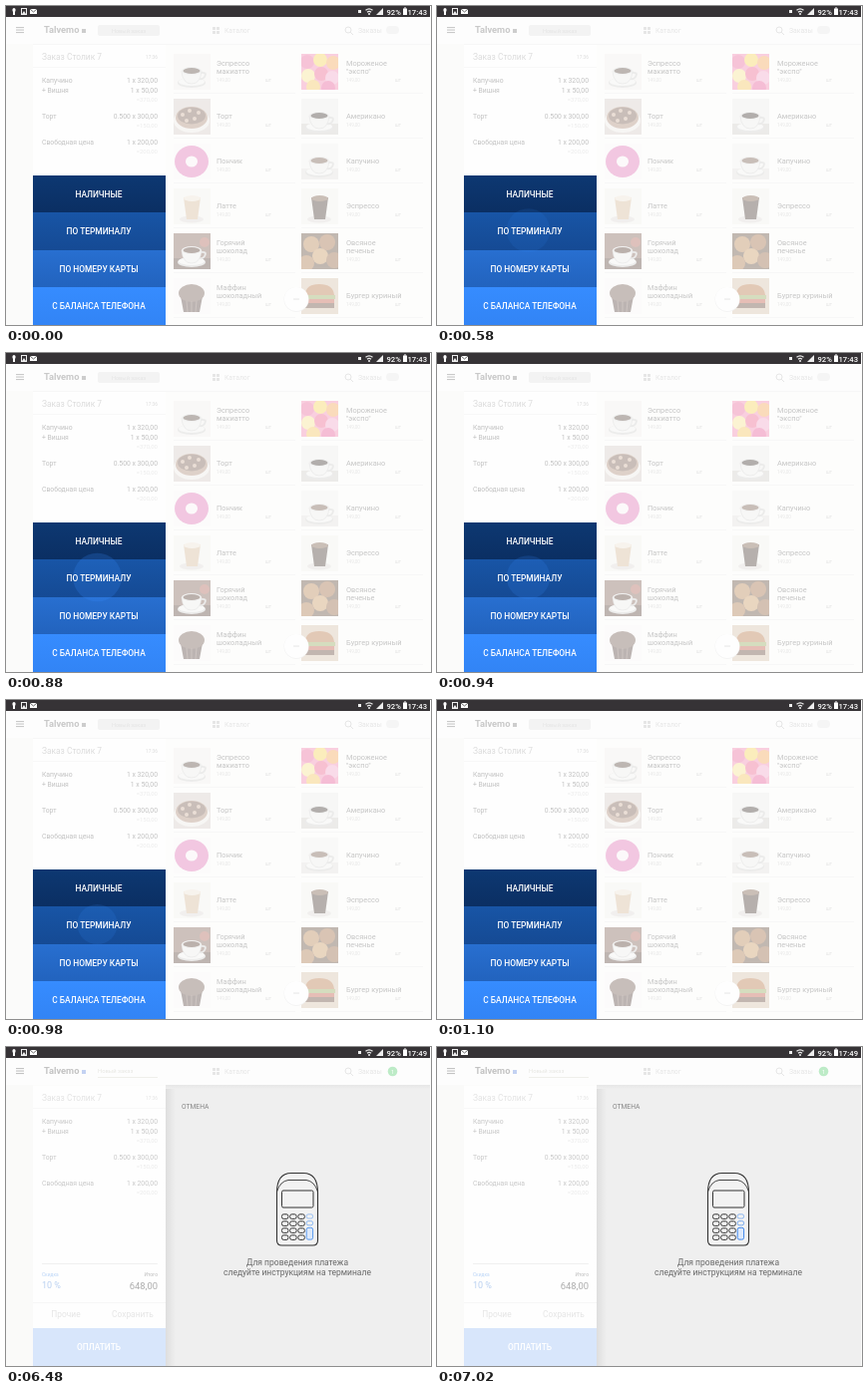
Animation of 426x320 px, one loop 8 s. Source, as an HTML page:

```html
<!DOCTYPE html>
<html lang="ru">
<head>
<meta charset="utf-8">
<title>Оплата заказа</title>
<style>
html, body { margin: 0; width: 100%; height: 100%; overflow: hidden; background: #fff; }
svg { display: block; width: 426px; height: 320px; }
text { font-family: Roboto, "Noto Sans", sans-serif; }
</style>
</head>
<body>
<svg id="stage" viewBox="0 0 426 320" xmlns="http://www.w3.org/2000/svg"></svg>
<script>
const LOOP = 8000, TAP = 500, CONNECT = 1120, FOLLOW = 6480, BLINK = 7020;
const BRAND = 'Talvemo';

const rect = (x, y, w, h, fill, more = '') =>
  `<rect x="${x}" y="${y}" width="${w}" height="${h}" fill="${fill}" ${more}/>`;
const disc = (x, y, rx, fill, ry = rx, more = '') =>
  `<ellipse cx="${x}" cy="${y}" rx="${rx}" ry="${ry}" fill="${fill}" ${more}/>`;
const path = (d, stroke, width = 1, fill = 'none') =>
  `<path d="${d}" stroke="${stroke}" stroke-width="${width}" fill="${fill}"/>`;
const shape = (d, fill) => path(d, 'none', 0, fill);
const label = (x, y, s, size, fill, anchor = 'start', more = '') =>
  `<text x="${x}" y="${y}" font-size="${size}" fill="${fill}" text-anchor="${anchor}" ${more}>${s}</text>`;
const group = (s, more = '') => `<g ${more}>${s}</g>`;
const dots = (list, r) => list.map(([x, y, c]) => disc(x, y, r, c)).join('');

// Product pictures, each in a 37 x 36 box
function cup(back, coffee, low = back) {
  return rect(0, 0, 37, 36, back) + rect(0, 25, 37, 11, low) +
    disc(18, 29, 14, '#cfcfcf', 5) + disc(18, 28, 13, '#f2f2f2', 4) +
    path('M27 19q7-1 4 4q-2 3-5 2', '#ccc', 1.8) +
    path('M8 17q1 13 10 13q9 0 10-13z', '#c0c0c0', .6, '#ededed') +
    disc(18, 17, 10, '#dedede', 4) + disc(18, 17, 8.5, coffee, 3);
}
function glass(coffee, foam) {
  return rect(0, 0, 37, 36, '#f3f2f0') + disc(18, 31, 12, '#dcd9d6', 3.5) +
    shape('M10 9h17l-3 22H13z', coffee) + disc(18.5, 10, 8.5, foam, 3);
}
const pictures = {
  espresso: () => cup('#f2f1ef', '#4d3b32'),
  cake: () => rect(0, 0, 37, 36, '#d4cbc6') + disc(18, 22, 18, '#eeeae8', 12) +
    disc(18, 19, 16, '#a98672', 11) + disc(18, 17, 14, '#6f5244', 8.5) +
    dots([[9, 16, '#c9aa94'], [16, 12, '#c9aa94'], [25, 14, '#c9aa94'], [21, 20, '#c9aa94'], [13, 22, '#c9aa94']], 2),
  donut: () => rect(0, 0, 37, 36, '#fbf9fa') + disc(18, 18, 17, '#e06ab2', 16) +
    disc(18, 18, 6, '#fbf4f8', 5.5),
  latte: () => glass('#d5b794', '#efe3d5'),
  cocoa: () => cup('#7b594d', '#4a2c22', '#51372e') + disc(31, 9, 5, '#a85a4c'),
  muffin: () => rect(0, 0, 37, 36, '#fbfafa') +
    shape('M7 18h22l-3 16H10z', '#4b3633') + disc(18, 15, 13, '#6a5149', 9) +
    path('M13 23l1 11M18 23v11M23 23l-1 11', '#7d655d', 1),
  sweets: () => rect(0, 0, 37, 36, '#f280ae') +
    dots([[6, 8, '#ea5f98'], [19, 6, '#f8d24c'], [32, 9, '#f7a04a'], [7, 22, '#f9e38a'],
      [20, 20, '#ef5686'], [31, 24, '#f4a1c8'], [12, 33, '#f6c24f'], [27, 34, '#e74f91']], 7),
  americano: () => cup('#eeedec', '#2f2622', '#d0cdca'),
  cappuccino: () => cup('#f4f3f1', '#6d5142', '#e4e1de'),
  shot: () => glass('#3a2a24', '#73543f'),
  cookies: () => rect(0, 0, 37, 36, '#5a4030') +
    dots([[10, 11, '#b57c48'], [26, 9, '#9b6238'], [19, 23, '#c79259'], [33, 27, '#8d5a34'], [5, 30, '#a66f40']], 8),
  burger: () => rect(0, 0, 37, 36, '#d6bfa8') + shape('M4 17q0-11 14-11t15 11z', '#b56f3c') +
    rect(3, 17, 31, 4, '#8fa555') + rect(4, 21, 29, 4, '#c0523d') + rect(4, 25, 29, 5, '#5b3b2d')
};
const products = [
  ['espresso', 'Эспрессо', 'макиатто'], ['sweets', 'Мороженое', '"экспо"'],
  ['cake', 'Торт'], ['americano', 'Американо'],
  ['donut', 'Пончик'], ['cappuccino', 'Капучино'],
  ['latte', 'Латте'], ['shot', 'Эспрессо'],
  ['cocoa', 'Горячий', 'шоколад'], ['cookies', 'Овсяное', 'печенье'],
  ['muffin', 'Маффин', 'шоколадный'], ['burger', 'Бургер куриный']
];

function product([kind, first, second], i) {
  const right = i % 2, x = right ? 296 : 168, tx = right ? 341 : 211;
  const y = 48 + 45 * (i >> 1), base = second ? y + 12 : y + 20;
  return group(pictures[kind](), `transform="translate(${x} ${y})" clip-path="url(#frame)" opacity=".36"`) +
    label(tx, base, first, 7.4, '#c6c6c6') +
    (second ? label(tx, base + 8, second, 7.4, '#c6c6c6') : '') +
    label(tx, y + 28, '149,00', 4.6, '#e6e6e6') +
    label(tx + 55, y + 28, 'шт', 4.6, '#e2e2e2', 'end') +
    rect(x, y + 39, 122, 1, '#f7f7f7');
}

function header(ink, soft, mark) {
  return rect(0, 11, 425, 27, '#fdfdfd') +
    [21, 23.5, 26].map(y => rect(10, y, 8, 1.1, ink)).join('') +
    label(38, 27, BRAND, 9.3, ink, 'start', 'font-weight="700"') +
    rect(76, 23, 4, 4, mark) +
    [207, 211].map(x => rect(x, 21, 3, 3, soft) + rect(x, 25, 3, 3, soft)).join('') +
    label(219, 27, 'Каталог', 6.8, soft) +
    `<circle cx="343" cy="24" r="3" fill="none" stroke="${soft}"/>` +
    path('M345 26l3 3', soft) +
    label(353, 27, 'Заказы', 6.8, soft);
}

const order = [
  [77, 'Капучино', '1 x 320,00'], [87, '+ Вишня', '1 x 50,00', '=370,00'],
  [113, 'Торт', '0.500 x 300,00', '=150,00'], [139, 'Свободная цена', '1 x 200,00', '=200,00']
];
function receipt(title, ink, sum) {
  return label(36, 54, 'Заказ Столик 7', 8.4, title) +
    label(152, 53, '17:36', 4.8, title, 'end') +
    rect(27, 61, 133, .6, '#f5f5f5') +
    order.map(([y, name, price, total]) =>
      label(36, y, name, 6.8, ink) + label(152, y, price, 6.8, ink, 'end') +
      (total ? label(152, y + 8.5, total, 6, sum, 'end') : '')).join('');
}

function statusBar() {
  return rect(0, 0, 425, 11, '#363336') +
    rect(6.5, 2, 3, 4, '#fff', 'rx="1.5"') + rect(7, 5, 2, 4, '#fff') +
    rect(15.5, 2.5, 5, 6, 'none', 'stroke="#eee"') + shape('M16 8l2-3l2 3z', '#eee') +
    rect(24, 3, 7, 5, '#fff') + path('M24 3l3.5 3L31 3', '#444', .8) +
    rect(353, 4, 3, 3, '#eee') +
    path('M360.5 4.3q3.5-2.8 7 0M362 6.2q2-1.6 4 0', '#eee', 1.2) + disc(364, 8, 1, '#eee') +
    shape('M371 9h7V2z', '#eee') +
    label(381.5, 8.7, '92%', 7.7, '#fff', 'start', 'font-weight="500"') +
    rect(398, 2.5, 4, 6.5, '#fff') + rect(399, 1.5, 2, 1, '#fff') +
    label(422, 8.7, '', 7.7, '#fff', 'end', 'id="clock" font-weight="500"');
}

const buttons = [
  ['НАЛИЧНЫЕ', '#0d3872', '#0b2f63'], ['ПО ТЕРМИНАЛУ', '#1855a6', '#154a94'],
  ['ПО НОМЕРУ КАРТЫ', '#286fd0', '#2263be'], ['С БАЛАНСА ТЕЛЕФОНА', '#368cff', '#3284f5']
];
const buttonTop = i => Math.floor(170 + 37.5 * i);
const shade = (id, from, to, dir = 'x2="0" y2="1"') =>
  `<linearGradient id="${id}" ${dir}><stop stop-color="${from}"/><stop offset="1" stop-color="${to}"/></linearGradient>`;

function menuScene() {
  return rect(0, 11, 426, 309, '#fdfdfc') + rect(0, 38, 27, 282, '#fbfbfa') +
    header('#c9c9c9', '#e6e6e6', '#cdcdcd') +
    rect(92, 19, 62, 11, '#f3f3f3', 'rx="2"') + label(123, 27, 'Новый заказ', 5.6, '#e4e4e4', 'middle') +
    rect(381, 20, 13, 8, '#f5f5f5', 'rx="4"') +
    rect(27, 38, 398, 1, '#f7f7f7') +
    rect(27, 39, 133, 131, '#fefefe') +
    receipt('#dcdcdc', '#c2c2c2', '#ebebeb') +
    products.map(product).join('') +
    disc(291, 294.5, 12.5, '#f4f4f4') + disc(291, 294, 12, '#fefefe') +
    path('M288 294h6', '#e6e6e6', 1) +
    buttons.map((b, i) => rect(27, buttonTop(i), 133, buttonTop(i + 1) - buttonTop(i), `url(#b${i})`)).join('') +
    '<circle id="tap" cx="91.5" cy="225" fill="#368cff"/>' +
    buttons.map(([s], i) => label(93, 192 + 37.4 * i, s, 8.4, '#fff', 'middle', 'font-weight="500"')).join('');
}

function terminal() {
  const key = (x, y, h, more) => rect(x, y, 6.4, h, 'none', `rx="1.8" ${more}`);
  let keys = '';
  for (let r = 0; r < 4; r++)
    for (let c = 0; c < 3; c++) keys += key(276.5 + 8.2 * c, 172.8 + 7 * r, 4.6, 'stroke="#333"');
  return path('M271.5 151Q271.5 131.5 286 131.5H298Q312.5 131.5 312.5 151V199Q312.5 204 307.5 204H276.5Q271.5 204 271.5 199Z', '#333', 1.1, '#f2f2f2') +
    path('M271.5 150Q275 139.5 283 138.5H301Q309 139.5 312.5 150', '#333', .9) +
    rect(276.5, 149, 31.5, 17, 'none', 'rx="1.5" stroke="#333"') + keys +
    group(key(301.2, 172.8, 4.2, 'opacity=".55"') + key(301.2, 179.6, 4.2, 'opacity=".65"') +
      rect(301.2, 186.3, 6.4, 11.8, '#dce9fb', 'rx="1.8"'), 'id="keys" stroke="#5a9af0"');
}

function payScene() {
  return rect(0, 11, 426, 309, '#fcfcfb') + rect(0, 38, 27, 282, '#fafaf9') +
    header('#c3c3c3', '#e6e6e6', '#c3d2f2') +
    label(92, 26, 'Новый заказ', 5.8, '#e6e6e2') + rect(92, 30, 60, 1, '#efefeb') +
    disc(387.5, 24.5, 4.8, '#bdebc7') + label(387.5, 26.8, '', 5.6, '#fff', 'middle', 'id="count"') +
    rect(27, 39, 133, 243, '#fefefe') +
    rect(160, 38, 265, 282, '#efefef') + rect(160, 38, 10, 282, 'url(#edge)') +
    rect(160, 38, 265, 4, 'url(#top)') +
    receipt('#e3e3e3', '#c8c8c8', '#eaeaea') +
    path('M36 217.5H152', '#ececec', .8) +
    label(36, 230, 'Скидка', 4.8, '#b9d4f7') + label(36, 242, '10 %', 9, '#b9d0f0') +
    label(152, 230, 'Итого', 5, '#bdbdbd', 'end') + label(152, 242.5, '648,00', 9.4, '#ababab', 'end') +
    rect(27, 256, 133, .7, '#f4f4f4') +
    label(60, 271, 'Прочие', 8.4, '#e5e5e5', 'middle') + label(127, 271, 'Сохранить', 8.4, '#e5e5e5', 'middle') +
    rect(27, 282, 133, 38, '#d8e6fb') +
    label(93, 304, 'ОПЛАТИТЬ', 8.4, '#fff', 'middle', 'font-weight="500"') +
    label(176, 62, 'ОТМЕНА', 6.7, '#858585') +
    group(terminal(), 'id="terminal"') +
    group(label(292, 223.5, 'Терминал подключен, вставьте карту...', 8.5, '#696969', 'middle'), 'id="insert"') +
    group(label(292, 219, 'Для проведения платежа', 8.5, '#696969', 'middle') +
      label(292, 228.8, 'следуйте инструкциям на терминале', 8.5, '#696969', 'middle'), 'id="follow"');
}

const $ = id => document.getElementById(id);
$('stage').innerHTML = '<defs>' +
  buttons.map(([, a, b], i) => shade('b' + i, a, b)).join('') +
  shade('edge', '#dedede', '#efefef', 'x2="1" y2="0"') + shade('top', '#e6e6e6', '#efefef') +
  '<clipPath id="frame"><rect width="37" height="36"/></clipPath></defs>' +
  group(menuScene(), 'id="menu"') + group(payScene(), 'id="pay"') + statusBar();

const show = (id, on) => $(id).setAttribute('display', on ? 'inline' : 'none');

// The touch mark swells for 200 ms, then shrinks and fades for 400 ms
function drawTap(t) {
  const s = Math.floor((t - TAP) / 20) * 20;
  const rise = Math.min(1, s / 200), fall = Math.max(0, (s - 200) / 400);
  const visible = s >= 0 && fall < 1;
  $('tap').setAttribute('r', visible ? 15 + 17 * (rise - fall) : 0);
  $('tap').setAttribute('opacity', visible ? .26 * rise * (1 - fall * fall) : 0);
}

function draw(now) {
  const t = now % LOOP, paying = t >= CONNECT, following = t >= FOLLOW;
  show('menu', !paying);
  show('pay', paying);
  show('insert', !following);
  show('follow', following);
  drawTap(t);
  $('clock').textContent = following ? '17:49' : paying ? '17:47' : '17:43';
  $('count').textContent = following ? '1' : '4';
  $('terminal').setAttribute('transform', `translate(0 ${following ? -5 : 0})`);
  $('keys').setAttribute('stroke', t >= BLINK ? '#3f87ec' : '#5a9af0');
}

const start = performance.now();
function tick() {
  draw(performance.now() - start);
  requestAnimationFrame(tick);
}
tick();
</script>
</body>
</html>
```
